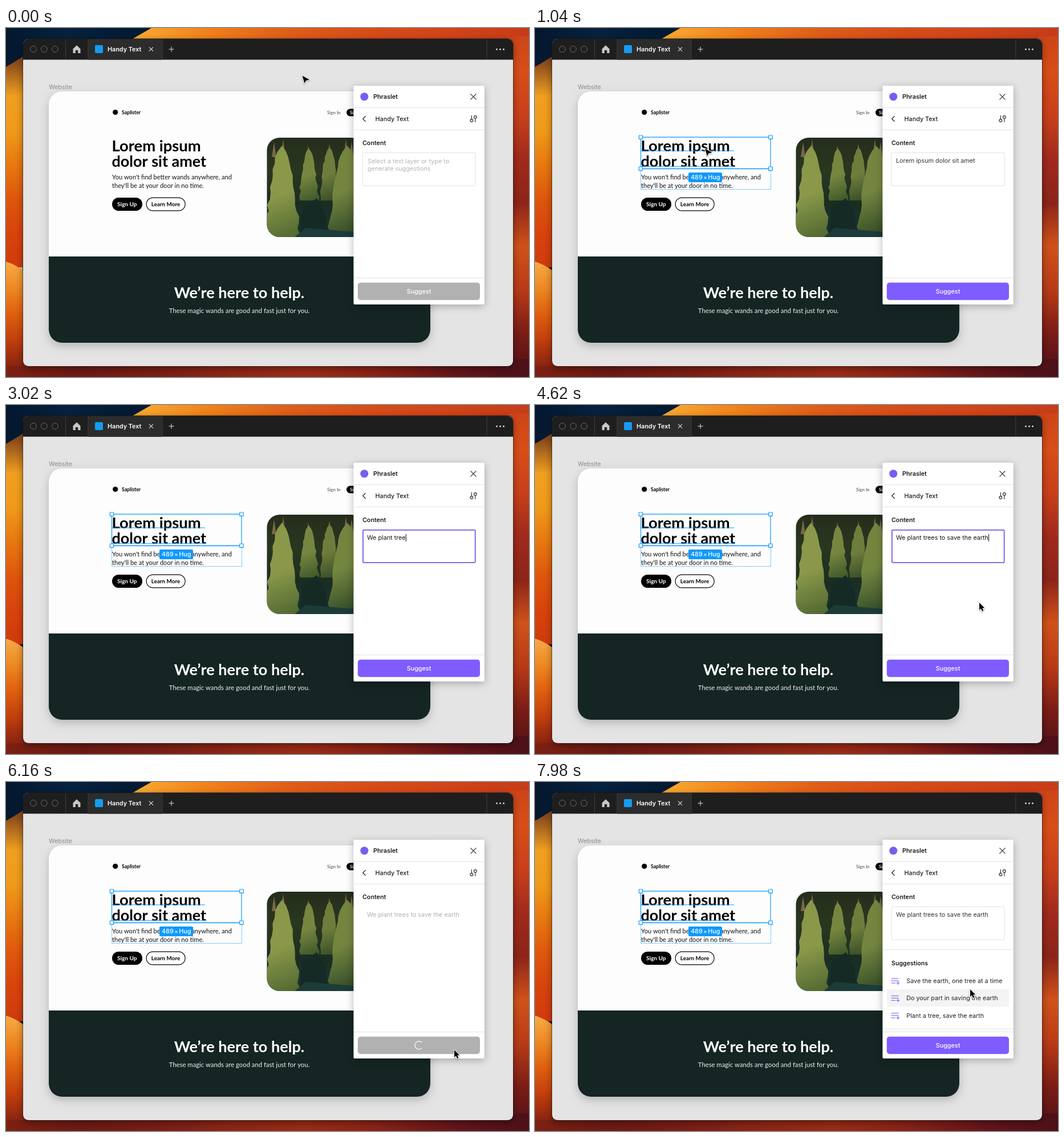
These frames come from a looping animation (917x611 px, 8 s). An HTML page with a canvas:

```html
<!DOCTYPE html>
<html lang="en">
<head>
<meta charset="utf-8">
<title>Writing helper demo</title>
<style>
html, body { margin: 0; width: 100%; height: 100%; overflow: hidden; background: #e5e5e5; }
canvas { display: block; width: 917px; height: 611px; }
</style>
</head>
<body>
<canvas id="stage"></canvas>
<script>
const W = 917, H = 611, LOOP = 8000;
const BLUE = '#0d99ff', VIOLET = '#7f5cff', INK = '#1c1c1c';
const ui = (weight = 400, size = 10.8) => `${weight} ${size}px Inter, sans-serif`;
const web = (weight, size) => `${weight} ${size}px Lato, sans-serif`;
const scale = window.devicePixelRatio || 1;

function setUp(canvas) {
  canvas.width = W * scale;
  canvas.height = H * scale;
  const context = canvas.getContext('2d');
  context.scale(scale, scale);
  return context;
}
const screen = setUp(document.getElementById('stage'));
const backdrop = document.createElement('canvas');
const panelLayer = document.createElement('canvas');
let c = screen;

// Drawing helpers, all working on the current context c

function box(x, y, w, h, r, fill, stroke, width = 1) {
  c.beginPath();
  c.roundRect(x, y, w, h, r);
  if (fill) { c.fillStyle = fill; c.fill(); }
  if (stroke) { c.strokeStyle = stroke; c.lineWidth = width; c.stroke(); }
}

function dot(x, y, r, fill, stroke, width = 1) {
  box(x - r, y - r, 2 * r, 2 * r, r, fill, stroke, width);
}

function trace(points, close) {
  c.beginPath();
  points.forEach(([x, y]) => c.lineTo(x, y));
  if (close) c.closePath();
}

function line(points, color, width = 1) {
  trace(points);
  c.strokeStyle = color;
  c.lineWidth = width;
  c.stroke();
}

function shape(points, fill) {
  trace(points, true);
  c.fillStyle = fill;
  c.fill();
}

function label(text, x, y, font, color, align = 'left') {
  c.font = font;
  c.fillStyle = color;
  c.textAlign = align;
  c.fillText(text, x, y);
}

function cross(x, y, r, color, width) {
  line([[x - r, y - r], [x + r, y + r]], color, width);
  line([[x + r, y - r], [x - r, y + r]], color, width);
}

function plus(x, y, r, color, width) {
  line([[x - r, y], [x + r, y]], color, width);
  line([[x, y - r], [x, y + r]], color, width);
}

function fade(x0, y0, x1, y1, ...colors) {
  const g = c.createLinearGradient(x0, y0, x1, y1);
  colors.forEach((color, i) => g.addColorStop(i / (colors.length - 1), color));
  return g;
}

function shadow(color, blur, dy) {
  c.shadowColor = color;
  c.shadowBlur = blur * scale;
  c.shadowOffsetY = dy * scale;
}

function noShadow() { c.shadowColor = 'transparent'; }

function seeded(seed) {
  return () => (seed = (seed * 16807) % 2147483647) / 2147483647;
}

// Static scenery

function drawWallpaper() {
  c.fillStyle = fade(220, 0, W, 0, '#fbac32', '#f0801a', '#e05d18', '#d84c18', '#d24418', '#c63c18');
  c.fillRect(0, 0, W, 30);
  c.fillStyle = fade(0, 60, 0, 420, '#8a4a1c', '#f0a01f', '#f09a1a', '#e8780f', '#df560c', '#d8430c', '#cf3a0c');
  c.fillRect(0, 19, 40, 400);
  c.fillStyle = fade(0, 0, 0, H, '#cb4218', '#d84e18', '#c8401a', '#a02a1c', '#8c2418', '#d0521a', '#b83a16', '#7a1c16', '#4c1018');
  c.fillRect(880, 15, 37, H);
  c.fillStyle = fade(0, 0, W, 0, '#7c2012', '#6e1a14', '#7a1e16', '#8e2616', '#9c2c16', '#8a2216', '#66161a', '#4c1018');
  c.fillRect(0, 580, W, 31);

  // Dark corner and the bright petal at the left
  c.fillStyle = fade(0, 0, 220, 0, '#04182f', '#06223f', '#031a33');
  c.beginPath();
  c.moveTo(0, 0); c.lineTo(255, 0); c.lineTo(220, 20); c.lineTo(30, 50);
  c.quadraticCurveTo(14, 60, 0, 68);
  c.fill();
  c.fillStyle = fade(0, 408, 0, 592, '#f8ab48', '#ee8a22', '#e0600f', '#c23f0c', '#8a2410');
  c.beginPath();
  c.moveTo(0, 409);
  c.quadraticCurveTo(18, 414, 34, 428);
  c.lineTo(34, 592); c.lineTo(0, 592);
  c.fill();
}

function drawTree(x, top, base, half, light, dark, seed) {
  const random = seeded(seed), steps = 16, points = [];
  for (let side = -1; side <= 1; side += 2) {
    for (let i = 0; i <= steps; i++) {
      const u = side < 0 ? 1 - i / steps : i / steps;
      const spread = Math.pow(u, 0.5) * (0.85 + random() * 0.25);
      points.push([x + side * half * spread, top + (base - top) * u]);
    }
  }
  shape(points, fade(x - half, top, x + half, base, light, light, dark));
}

function drawPhoto() {
  c.save();
  c.beginPath();
  c.roundRect(457.5, 192, 170, 174, 22);
  c.clip();
  c.fillStyle = fade(0, 192, 0, 366, '#252d1c', '#2a371f', '#1b2d22', '#173433');
  c.fillRect(457, 192, 160, 175);
  const tips = [[470, 200], [486, 195], [530, 206], [567, 203], [596, 195], [606, 199]];
  tips.forEach(([x, y]) => shape([[x - 4, 226], [x, y], [x + 4, 226]], '#7a6748'));
  drawTree(531, 211, 302, 18, '#77863f', '#3c5529', 11);
  drawTree(567, 209, 302, 18, '#6f7d3c', '#334a26', 23);
  drawTree(484, 206, 372, 32, '#8b984a', '#4b632e', 37);
  drawTree(598, 206, 358, 34, '#74853f', '#2c4526', 51);
  shape([[514, 367], [520, 315], [545, 298], [560, 325], [566, 367]], '#152a25');
  shape([[505, 367], [525, 350], [612, 357], [612, 367]], '#1d3b39');
  c.restore();
}

function drawPage() {
  label('Website', 75, 107, ui(400, 10.7), '#8c8c8c');
  shadow('rgba(0,0,0,.2)', 16, 6);
  box(75, 111, 669, 440, 23, '#fdfdfd');
  noShadow();
  box(75, 400, 669, 151, [0, 0, 23, 23], '#142523');

  dot(191.7, 147.5, 4.6, '#000');
  label('Saplister', 203, 151, web(700, 8.6), '#000');
  label('Sign In', 563, 150.5, web(400, 8), '#444');
  box(597, 141.5, 42, 13, 6.5, '#000');
  label('Sign Up', 603, 150.5, web(700, 7.2), '#fff');

  label('Lorem ipsum', 185.5, 215.5, web(700, 27.4), '#000');
  label('dolor sit amet', 185.5, 242.5, web(700, 27), '#000');
  label("You won't find better wands anywhere, and", 186, 265.3, web(400, 11.08), '#111');
  label("they'll be at your door in no time.", 186, 279.8, web(400, 11.08), '#111');
  box(186, 297, 53, 23, 11.5, '#000');
  label('Sign Up', 212.2, 312.3, web(700, 10.1), '#fff', 'center');
  box(246.1, 297.1, 68, 22.8, 11.4, '#fff', '#000', 1.2);
  label('Learn More', 280, 312.3, web(700, 9.9), '#000', 'center');
  drawPhoto();

  label('We’re here to help.', 409, 472.5, web(700, 27.1), '#fff', 'center');
  label('These magic wands are good and fast just for you.', 409, 499, web(400, 11.27), '#f0f3f2', 'center');
}

function drawTitleBar() {
  box(30, 19, 859, 36.6, [9, 9, 0, 0], '#1e1e1e');
  c.fillStyle = '#2c2c2c';
  c.fillRect(144, 19.5, 130, 36.1);
  [104.5, 144, 274, 843].forEach(x => line([[x, 20], [x, 55]], '#3c3c3c'));
  [48, 67, 86].forEach(x => dot(x, 37, 5.4, null, '#686868'));
  shape([[117.5, 36.5], [124, 30.3], [130.5, 36.5], [130.5, 44], [126.2, 44],
    [126.2, 39], [121.8, 39], [121.8, 44], [117.5, 44]], '#c7c7c7');
  box(156, 30, 14, 14, 2, '#159cf2');
  label('Handy Text', 178, 41.2, ui(600, 10.8), '#fff');
  cross(254.5, 37.2, 3.5, '#d4d4d4', 1.2);
  plus(290, 37.2, 4.5, '#d4d4d4', 1.1);
  [860.5, 866.5, 872.5].forEach(x => dot(x, 37.2, 1.5, '#d4d4d4'));
}

function drawBackdrop() {
  drawWallpaper();
  shadow('rgba(0,0,0,.4)', 14, 4);
  box(30, 19, 859, 573, 9, '#e4e4e4');
  noShadow();
  drawPage();
  drawTitleBar();
  box(29.5, 18.5, 860, 574, 9.5, null, 'rgba(20,20,20,.5)');
}

function drawPanelFrame() {
  shadow('rgba(0,0,0,.28)', 14, 3);
  box(609.4, 101, 229.4, 383, 2, '#fff');
  noShadow();
  [139.5, 178.3, 437.5].forEach(y => line([[610, y], [839, y]], '#e3e3e3'));
  dot(628.3, 120.3, 7, '#765ff0');
  label('Phraslet', 644, 124.1, ui(600), INK);
  cross(819.5, 120.3, 5, '#222', 1.1);
  line([[630.5, 154.3], [625.7, 159], [630.5, 163.7]], '#222', 1.2);
  label('Handy Text', 647.5, 163, ui(500), INK);
  line([[816.4, 153], [816.4, 159.4]], '#222', 1.1);
  line([[822.8, 158.5], [822.8, 165]], '#222', 1.1);
  dot(816.4, 162, 2.4, null, '#222', 1.1);
  dot(822.8, 156, 2.4, null, '#222', 1.1);
  label('Content', 625, 205.3, ui(600, 10.7), INK);
}

// Timeline

const TEXT = 'We plant trees to save the earth';
const IDEAS = ['Save the earth, one tree at a time', 'Do your part in saving the earth', 'Plant a tree, save the earth'];
const AT = { hover: 640, select: 860, focus: 1560, all: 1720, type: 1900, show: 4420, load: 5260, done: 7000 };

const ease = {
  both: u => u * u * (3 - 2 * u),
  in: u => u * u,
  out: u => u * (2 - u)
};

// Start time, end time, from, to, easing
const moves = [
  [40, 840, [519.5, 83.5], [298, 211], ease.both],
  [1060, 1540, [298, 211], [705, 243], ease.both],
  [4420, 4620, [705, 243], [779, 346], ease.in],
  [4620, 5020, [779, 346], [786, 469], ease.out],
  [7240, 7980, [786, 469], [763, 363], ease.both]
];

function pointer(t) {
  const move = moves.findLast(m => t >= m[0]) || moves[0];
  const [start, end, from, to, curve] = move;
  const u = curve(Math.min(1, Math.max(0, (t - start) / (end - start))));
  return from.map((v, i) => v + (to[i] - v) * u);
}

function typedLength(t) {
  const n = t < 2992 ? 1 + (t - AT.type) / 91 : 13 + (t - 2992) / 76;
  return Math.min(TEXT.length, Math.floor(n));
}

// Moving parts

function drawSelection(t) {
  if (t < AT.hover) return;
  line([[186, 215], [349, 215]], BLUE);
  line([[186, 242.3], [351, 242.3]], BLUE);
  if (t < AT.select) return;
  c.setLineDash([1.5, 1.5]);
  box(185.5, 247, 228, 35.5, 0, null, BLUE);
  c.setLineDash([]);
  box(185.5, 191.2, 227.5, 55, 0, null, BLUE, 1.2);
  for (const x of [185.5, 413]) {
    for (const y of [191.2, 246.2]) box(x - 3.2, y - 3.2, 6.4, 6.4, 0.5, '#fff', BLUE, 1.2);
  }
  box(269, 253, 59, 17, 2, BLUE);
  label('489', 273, 265.3, ui(500), '#fff');
  label('×', 298.4, 265.2, ui(500, 9.5), '#fff', 'center');
  label('Hug', 303.2, 265.3, ui(500), '#fff');
}

function drawField(t) {
  const loading = t >= AT.load && t < AT.done;
  const focused = t >= AT.focus && t < AT.load;
  if (focused) box(625.9, 218.9, 196.8, 57, 1.5, '#fff', '#785be0', 1.8);
  else if (!loading) box(625.2, 218.2, 197.8, 58, 2, '#fff', '#e0e0e0');

  if (t < AT.select) {
    label('Select a text layer or type to', 634, 237.2, ui(), '#b5b5b5');
    label('generate suggestions', 634, 249.7, ui(), '#b5b5b5');
    return;
  }
  const text = t < AT.type ? 'Lorem ipsum dolor sit amet' : TEXT.slice(0, typedLength(t));
  c.font = ui();
  const width = c.measureText(text).width;
  if (t >= AT.all && t < AT.type) {
    c.fillStyle = '#b9d7fb';
    c.fillRect(633, 226, width, 13.5);
  }
  label(text, 633, 236.4, ui(), loading ? '#b0b0b0' : focused ? '#161616' : '#333');
  const blink = t < 4440 || (t - 4440) % 1000 < 500;
  if (focused && blink && (t < AT.all || t >= AT.type)) {
    line([[633.6 + width, 226], [633.6 + width, 239]], '#111');
  }
}

function drawSuggestions(y) {
  line([[610, 293.5], [839, 293.5]], '#e3e3e3');
  line([[610, 432.3], [839, 432.3]], '#e3e3e3');
  label('Suggestions', 625, 321, ui(600, 10.6), INK);
  IDEAS.forEach((idea, i) => {
    const mid = 348 + i * 30.4, top = mid - 15.6;
    if (y >= top && y < top + 30.4) box(617, top, 214, 30.4, 2, '#f4f4f4');
    line([[624.5, mid - 4], [637.5, mid - 4]], VIOLET, 1.1);
    line([[624.5, mid], [637.5, mid]], VIOLET, 1.1);
    line([[624.5, mid + 4], [632, mid + 4]], VIOLET, 1.1);
    plus(636.5, mid + 4, 3, VIOLET, 1.1);
    label(idea, 651.3, mid + 3.7, ui(400, 10.75), '#222');
  });
}

function drawButton(t) {
  const loading = t >= AT.load && t < AT.done;
  const active = t >= AT.select && !loading;
  box(616.8, 445.8, 214.2, 30.5, 5, active ? VIOLET : '#b1b1b1');
  if (!loading) {
    label('Suggest', 724, 465, ui(500), '#fff', 'center');
    return;
  }
  const turn = (t - AT.load) / 800 * Math.PI * 2;
  c.beginPath();
  c.arc(724, 461, 7, turn, turn + Math.PI * 1.5);
  c.strokeStyle = '#f4f4f4';
  c.lineWidth = 1.4;
  c.stroke();
}

function drawPointer(t, [x, y]) {
  if (t >= AT.type - 20 && t < AT.show) return;
  const overPanel = x > 610 && y > 101;
  const arrow = overPanel
    ? [[0, 0], [0, 13], [2.9, 10.3], [5, 15], [7.3, 14], [5.3, 9.5], [9.2, 9.3]]
    : [[0, 0], [3.9, 13.4], [6.6, 8.4], [12.6, 7]];
  c.save();
  c.translate(x, y);
  c.lineJoin = 'round';
  shadow('rgba(0,0,0,.35)', 3, 1);
  trace(arrow, true);
  c.strokeStyle = '#fff';
  c.lineWidth = 2;
  c.stroke();
  noShadow();
  shape(arrow, '#000');
  c.restore();
}

function render(now) {
  const t = now % LOOP;
  const at = pointer(t);
  c.drawImage(backdrop, 0, 0, W, H);
  drawSelection(t);
  c.drawImage(panelLayer, 0, 0, W, H);
  drawField(t);
  if (t >= AT.done) drawSuggestions(at[1]);
  drawButton(t);
  drawPointer(t, at);
}

c = setUp(backdrop);
drawBackdrop();
c = setUp(panelLayer);
drawPanelFrame();
c = screen;

let origin;
function tick(now) {
  origin ??= now;
  render(now - origin);
  requestAnimationFrame(tick);
}
render(0);
requestAnimationFrame(tick);
</script>
</body>
</html>
```
